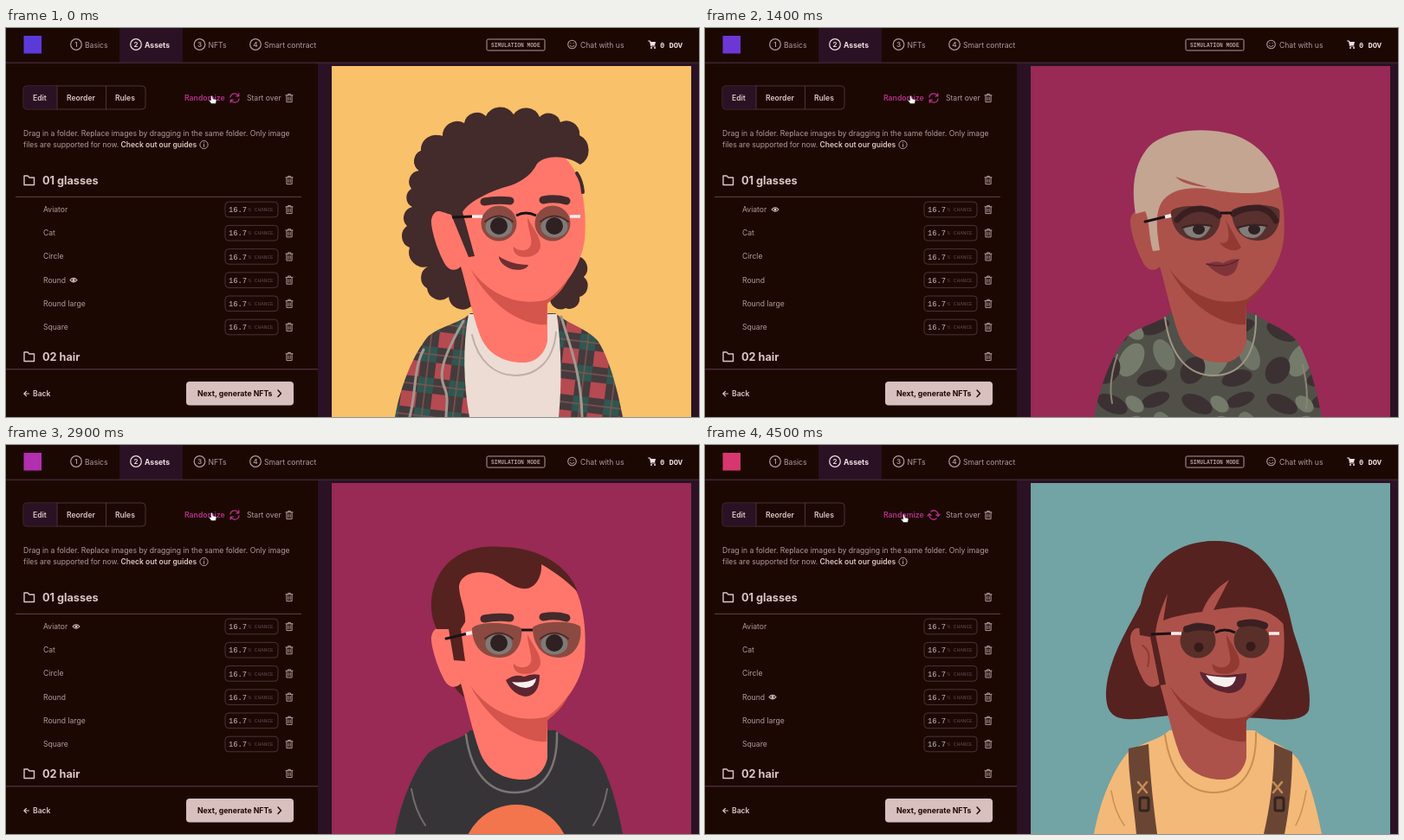
Write an HTML page that moves like this. It is 800 px wide and 450 px high and loops after 4600 ms.

```html
<!DOCTYPE html>
<html lang="en">
<head>
<meta charset="utf-8">
<title>Avatar randomizer</title>
<style>
html, body { margin: 0; width: 100%; height: 100%; overflow: hidden; background: #1c0803; }
svg { display: block; width: 800px; height: 450px; font-family: Inter, Roboto, sans-serif; }
.mono { font-family: "Liberation Mono", "DejaVu Sans Mono", monospace; }
text { white-space: pre; }
</style>
</head>
<body>
<svg id="stage" viewBox="0 0 800 450" xmlns="http://www.w3.org/2000/svg"></svg>
<script>
const fill = (d, c) => `<path d="${d}" fill="${c}"/>`;
const line = (d, c, w = 1, cap = 'round') =>
  `<path d="${d}" fill="none" stroke="${c}" stroke-width="${w}" stroke-linecap="${cap}" stroke-linejoin="round"/>`;
const rect = (x, y, w, h, c, r = 0, extra = '') =>
  `<rect x="${x}" y="${y}" width="${w}" height="${h}" rx="${r}" fill="${c}" ${extra}/>`;
const oval = (x, y, rx, c, ry = rx, extra = '') =>
  `<ellipse cx="${x}" cy="${y}" rx="${rx}" ry="${ry}" fill="${c}" ${extra}/>`;
const text = (x, y, s, c, weight = 400, size = 8.6, cls = '') =>
  `<text x="${x}" y="${y}" fill="${c}" font-weight="${weight}" font-size="${size}" class="${cls}">${s}</text>`;
const group = (s, attrs) => `<g ${attrs}>${s}</g>`;

// ---- interface ----
const PALE = '#dcc6c4', SOFT = '#b29a9b', RULE = '#4b3138', NIGHT = '#2a1224', PINK = '#b5318c';
const ROWS = ['Aviator', 'Cat', 'Circle', 'Round', 'Round large', 'Square'];
const EYE_X = { Aviator: 81, Cat: 65, Round: 78, 'Round large': 101 };
const rowY = i => 210 + i * 27.2;

const trash = (x, y) => group(
  line('M-4,-3.2H4M-1.4,-3.2V-4.6H1.4V-3.2M-3.1,-3.2V4.6H3.1V-3.2M-1.1,-1V2.7M1.1,-1V2.7', SOFT, 1),
  `transform="translate(${x} ${y})"`);
const step = (x, n, label, on) => {
  const c = on ? '#f0e2e4' : SOFT;
  return oval(x, 19, 6.3, 'none', 6.3, `stroke="${c}" stroke-width="1.2"`) +
    `<text x="${x}" y="22" font-size="8" font-weight="600" text-anchor="middle" fill="${c}">${n}</text>` +
    text(x + 10, 22.5, label, c, on ? 700 : 400);
};
const folder = (y, label) =>
  line(`M21,${y - 5}h4l2,2h5.5v8.5h-11.5z`, PALE, 1.4) +
  text(42, y + 4.7, label, PALE, 700, 12.7) + trash(327, y);
const row = (label, i) => {
  const y = rowY(i);
  return text(43, y + 3, label, SOFT) +
    rect(253, y - 8.8, 61, 17.6, 'none', 4, `stroke="${RULE}"`) +
    text(257, y + 3.2, '16.7', '#cbb7b6', 400, 8.8, 'mono') +
    text(279.5, y + 2.2, '% CHANCE', '#634650', 400, 6.1, 'mono') + trash(327, y);
};

const ui =
  rect(0, 0, 800, 40, '#1c0803') + rect(131, 0, 73, 40, NIGHT) +
  rect(0, 40, 360, 410, '#1c0803') + rect(0, 39.5, 800, 1.6, '#3d2430') +
  step(81, 1, 'Basics') + step(150, 2, 'Assets', true) + step(223.5, 3, 'NFTs') + step(288, 4, 'Smart contract') +
  rect(555, 13, 67, 13, 'none', 1.5, `stroke="${SOFT}"`) +
  text(560, 22, 'SIMULATION MODE', SOFT, 700, 6.3, 'mono') +
  oval(653.5, 19, 4.8, 'none', 4.8, `stroke="${SOFT}" stroke-width="1.1"`) +
  line('M651,20.5Q653.5,23 656,20.5M652,17.5v.3M655,17.5v.3', SOFT, 1) +
  text(663, 22.5, 'Chat with us', SOFT) +
  line('M741.5,15h2l1.2,6h4.5', '#f0e2e4', 1.2) + fill('M743.5,16H750L749,20H744.5Z', '#f0e2e4') +
  oval(745, 23, 1, '#f0e2e4') + oval(749, 23, 1, '#f0e2e4') +
  text(755, 22.5, '0 DOV', '#f0e2e4', 700, 8.7, 'mono') +
  rect(20, 67, 141, 27, 'none', 4, `stroke="${RULE}"`) + rect(20.5, 67.5, 38.5, 26, NIGHT, 3) +
  line('M59,67V94M115.5,67V94', RULE) +
  text(31, 83.8, 'Edit', PALE, 600) + text(70, 83.8, 'Reorder', PALE, 600) + text(126, 83.8, 'Rules', PALE, 600) +
  text(278, 83.8, 'Start over', SOFT) + trash(327, 81) +
  text(20, 124.5, 'Drag in a folder. Replace images by dragging in the same folder. Only image', SOFT) +
  text(20, 138, `files are supported for now. <tspan font-weight="600" fill="${PALE}">Check out our guides</tspan>`, SOFT, 400, 8.5) +
  oval(228.5, 135, 4.6, 'none', 4.6, `stroke="${SOFT}"`) + line('M228.5,134.5V137.3M228.5,132.6v.1', SOFT, 1.1) +
  folder(176, '01 glasses') + rect(11, 194.8, 330, 1.2, '#57383d') +
  ROWS.map(row).join('') + folder(380, '02 hair') +
  rect(0, 394, 360, 1.4, '#4a2c36') +
  line('M26.5,423H21M23.5,420.3L20.8,423L23.5,425.7', PALE, 1.2) + text(31, 426, 'Back', PALE, 600) +
  rect(208, 409, 124, 27.5, '#d8c0bf', 4) +
  text(221, 426, 'Next, generate NFTs', '#1c0803', 700, 8.7) +
  line('M314,419L317.5,422.7L314,426.5', '#1c0803', 1.4) +
  rect(20.5, 9, 20.5, 20.5, '#5c3ad9', 0, 'id="logo"') +
  group(text(206, 83.8, 'Randomize', 'currentColor', 600, 8.7) +
    group(line('M-5,-1A5,5 0 0 1 4.3,-2.6M5,1A5,5 0 0 1 -4.3,2.6M4.8,-5.2V-2.2H1.8M-4.8,5.2V2.2H-1.8', 'currentColor', 1.3),
      'id="spin" transform="translate(264 81)"'), 'id="random"') +
  group(line('M-4,0Q0,-4.6 4,0Q0,4.6 -4,0Z', PALE, 1.1) + oval(0, 0, 1.5, PALE), 'id="eye"') +
  group('<path d="M-1.4,-4.5q1-.8 1.8,.4l.6,3 3,.7q1.2,.6 .8,2l-.8,3h-5l-2.6-3.6q.4-1.5 2.2,0z" fill="#fff" stroke="#301a20" stroke-width=".5"/>', 'id="cursor"');

// ---- portraits ----
const CORAL = ['#ff776b', '#d5544b'], BROWN = ['#ad524a', '#923a32'], ROSE = ['#c36f6c', '#a34c46'];
const DARK = '#432a2b', INK = '#191315', MAROON = '#552220', SAND = '#c3a592';

const BODY = 'M449,450C456,412 470,378 487,357C500,345 524,342 536,330H634C650,343 672,348 684,363C699,388 707,424 712,450Z';
const COLLAR = 'M531,335C537,382 560,402 587,402C615,402 637,382 636,333';
const head = ([skin, shade]) =>
  fill('M505,213C503,190 503,165 520,145C535,128 555,123 578,123C610,124 645,140 658,168C668,190 670,220 668,245C664,275 645,300 625,316V362C622,378 610,388 596,387C575,387 555,377 547,355C538,330 532,300 525,276C517,283 510,280 505,270C497,255 490,230 491,222C493,212 499,210 505,213Z', skin) +
  fill('M536,278C555,306 590,324 625,314C635,307 645,297 651,286C643,305 633,311 625,319L624,343C600,345 560,325 536,278Z', shade);
const nose = c => fill('M602,219C608,231 617,242 617,251C617,262 605,267 593,264C588,262 585,258 586,253C592,259 603,259 606,251C608,244 602,232 602,219Z', c);
const brows = (c, y = 201) => line(`M552,${y}Q567,${y - 3} 582,${y - 1}M620,${y - 2}Q634,${y - 5} 647,${y - 1}`, c, 9);

const eyes = {
  wide: [569, 633].map(x => oval(x, 230, 15.5, '#7d7a77', 12.5) + oval(x, 229, 10, '#2f2022') +
    line(`M${x - 16},224q16,-13 32,0`, '#4d2b29', 2)).join(''),
  half: [568, 632].map(x => fill(`M${x - 16},232Q${x},226 ${x + 16},229Q${x + 10},243 ${x},243Q${x - 12},243 ${x - 16},232Z`, '#827d79') +
    oval(x + 2, 233, 7, '#2f2022', 6) + line(`M${x - 17},231q16,-6 34,-2`, '#3a2324', 2)).join(''),
  dot: oval(570, 234, 5.5, '#371a1a') + oval(630, 233, 5.5, '#371a1a')
};

const AVIATOR = 'M538,212C545,203 585,205 595,212C597,230 588,246 570,246C550,246 538,232 538,212ZM608,211C618,203 655,203 663,210C666,230 655,246 638,246C620,246 608,232 608,211Z';
const CAT = 'M533,209L545,206C565,208 590,212 596,218C594,236 580,246 565,245C548,243 538,230 533,209ZM607,218C625,208 645,206 663,205C665,225 652,243 632,244C616,243 608,232 607,218Z';
const glasses = {
  Round: (lens, look) => oval(569, 226, 20.5, lens) + oval(631, 226, 20.5, lens) + look +
    line('M515,219L538,218M589,217Q600,211 612,217', INK, 3, 'butt') +
    line('M538,218H550M651,218H663', '#f4eeee', 3.5, 'butt'),
  Aviator: (lens, look) => fill(AVIATOR, lens) + look +
    line('M508,224L531,218.5', INK, 3) + line('M531,218.5L538,217', '#f4eeee', 4, 'butt') + line('M595,214H608', INK, 3, 'butt'),
  'Round large': (lens, look) => oval(570, 226, 22, lens) + oval(635, 225, 22, lens) + look +
    [570, 635].map(x => oval(x, 226, 22.5, 'none', 22.5, `stroke="${INK}" stroke-width="4"`)).join('') +
    fill('M507,216L538,209L556,206L550,215L538,219L508,223ZM643,206L661,204L661,217L655,218Z', INK) +
    line('M592,219Q602,212 613,219', INK, 5) + oval(545, 213, 2.8, '#eee') + oval(657, 213, 2.8, '#eee'),
  Cat: (lens, look) => fill(CAT, lens) + look +
    line('M514,222L536,217M595,219Q601,216 607,219', INK, 4) +
    line('M536,209C560,208 585,212 595,218M607,218C620,210 645,206 662,206', '#2c1718', 3) +
    oval(541, 213, 3.4, '#f4eeee') + oval(661, 211, 3.4, '#f4eeee')
};

// Outline of curls: one outward arc between each pair of points.
const curls = pts => 'M' + pts.map(([x, y], i) => {
  if (!i) return `${x},${y}`;
  const r = 0.57 * Math.hypot(x - pts[i - 1][0], y - pts[i - 1][1]);
  return `A${r},${r} 0 0 0 ${x},${y}`;
}).join('');
const buzz = c =>
  fill('M497,213C486,190 490,160 507,140C525,120 550,116 572,118C615,118 650,140 660,170C646,156 632,146 618,138C619,150 613,164 602,166C584,168 574,151 556,148C536,145 523,153 523,165C524,180 531,190 530,205L525,213L530,250L517,249L511,213Z', c);

const shirt = fill(BODY, '#363437') + line(COLLAR, '#7b7574', 2.5) +
  line('M468,398Q472,422 484,440M694,398Q690,422 678,440', '#716b6a', 2) +
  oval(589, 478, 62, '#f2754d');

const plaid =
  fill(BODY, 'url(#plaid)') +
  fill('M534,331C527,368 528,412 535,450H638C642,410 641,370 636,331Z', '#ecdcd4') +
  line('M528,339C512,368 498,394 505,413C512,428 508,438 508,450M641,334C650,365 664,398 665,450M482,372C470,395 474,420 466,450', '#a3978e', 3) +
  line('M538,355C545,386 565,402 588,402C612,402 632,386 635,352', '#c0afa8', 2);

const camo = fill(BODY, 'url(#camo)') + line(COLLAR, '#a09484', 2) +
  line('M476,378Q465,410 470,434M690,390Q697,420 694,440', '#8b8374', 2);

let flecks = '';
for (let i = 0; i < 6; i++) for (let j = 0; j < 20; j++) {
  const x = 450 + j * 14 + i % 2 * 7, y = 352 + i * 19 + j * 7 % 11;
  flecks += line(`M${x},${y}l${(582 - x) / 30},11`, (i + j) % 3 ? '#e5d6ca' : '#a39e99', 4.5);
}
const sweater = fill(BODY, '#c5bfba') + group(flecks, 'clip-path="url(#body)"') +
  fill('M525,340L487,357C478,368 473,380 470,393L484,407L529,364ZM646,340L684,362C690,374 693,390 691,405L680,408L639,364Z', '#a05c35') +
  line('M533,335C540,377 561,395 587,395C614,395 631,377 634,333', '#eadad0', 15, 'butt') +
  `<path d="M533,335C540,377 561,395 587,395C614,395 631,377 634,333" fill="none" stroke="#b2a298" stroke-width="14" stroke-dasharray="2 8"/>` +
  line('M525,338C532,386 557,404 587,404C618,404 640,384 643,337', '#a79b93', 2);

const strap = d => fill(d, '#6b4533');
const overalls = fill(BODY, '#f3b978') + line(COLLAR, '#c98e52', 2) +
  strap('M489,351L512,346C514,385 518,420 522,450H498C495,415 488,380 489,351Z') +
  strap('M657,346L678,355C678,390 674,425 669,450H645C652,420 657,385 657,346Z') +
  [505, 661].map(x => line(`M${x - 5},390l10,12m0,-12l-10,12`, '#c58c55', 2.5) +
    rect(x - 3, 408, 10, 15, 'none', 2, 'stroke="#33231f" stroke-width="3"')).join('') +
  line('M469,400Q473,425 484,440M694,400Q690,425 682,440', '#c98e52', 1.5);

// Each look starts bare for a moment, then all layers appear.
const looks = [
  { start: 0, skin: CORAL, pair: 'Round', bg: '#f9c16a',
    back: fill(curls([[510, 128], [479, 142], [477, 165], [468, 186], [469, 207], [463, 229], [466, 254], [487, 276], [486, 301], [511, 311], [537, 322]]) + 'Z', DARK) +
      fill(curls([[628, 312], [646, 324], [662, 311], [667, 288], [660, 264]]) + 'Z', DARK),
    top: plaid,
    face: nose(CORAL[1]) + fill('M569,264C577,270 590,274 603,274C602,279 592,281 584,279C575,276 569,270 569,264Z', '#6d2f31'),
    hair: fill(curls([[663, 158], [662, 124], [640, 109], [616, 103], [586, 100], [554, 102], [529, 110], [504, 126], [479, 142], [477, 165], [485, 200]]) +
        'L498,211L514,216L534,265L541,264L527,213C535,200 560,188 583,182C597,177 608,168 613,157C622,147 645,146 663,158Z', DARK) +
      line('M659,168Q665,177 666,190', DARK, 4) + brows(DARK),
    lens: '#8b4a41', look: eyes.wide },
  { start: 600, skin: BROWN, pair: 'Aviator', bg: '#982a55', top: camo,
    face: fill('M601,222L619,254C610,262 598,254 594,248C606,252 607,240 601,222Z', BROWN[1]) +
      fill('M579,273Q590,268 598,272Q608,266 616,268Q614,287 600,287Q589,284 579,273Z', '#80343a') + line('M579,273Q600,279 616,268', '#542428', 1.5),
    hair: fill('M497,215C491,180 497,150 517,133C540,117 575,116 600,121C637,128 660,157 663,184C640,195 605,191 580,186C555,183 538,188 529,199C518,213 522,237 525,257L517,258C512,240 513,220 508,212Z', SAND) +
      fill('M543,172Q560,178 580,184Q552,182 543,172Z', BROWN[0]),
    lens: '#58302e', look: eyes.half + line('M545,222Q556,209 572,209Q586,210 593,217M610,215Q622,207 640,208Q654,211 659,223', '#3a1f21', 7) },
  { start: 1600, skin: ROSE, pair: 'Round large', bg: '#d8dadb', top: shirt,
    back: fill('M514,274L526,276L531,293Q521,287 514,274Z', SAND),
    face: fill('M602,225L613,252C608,262 598,262 592,256C602,256 604,244 602,225Z', '#9d3330') +
      fill('M571,262C585,266 602,266 617,262C619,276 609,284 596,282C583,280 574,273 571,262Z', '#6a2729') +
      fill('M578,265Q596,268 611,265Q612,277 599,277Q584,276 578,265Z', '#f7f1ee'),
    hair: buzz(SAND), lens: '#70433f', look: eyes.half },
  { start: 2500, skin: CORAL, pair: 'Aviator', bg: '#982a55', top: shirt,
    back: fill('M514,274L526,276L531,293Q521,287 514,274Z', MAROON),
    face: nose(CORAL[1]) + fill('M577,272Q588,264 598,268Q607,264 616,266Q616,290 599,291Q584,288 577,272Z', '#5d2530') +
      fill('M584,274Q600,276 612,270Q611,280 600,281Q589,280 584,274Z', '#f7f1ee'),
    hair: buzz(MAROON) + brows(DARK), lens: '#8b4a41', look: eyes.wide },
  { start: 3500, skin: BROWN, pair: 'Cat', bg: '#f9c16a', top: sweater,
    back: fill('M585,108C545,108 514,130 507,170C503,200 500,225 487,255C475,285 482,305 493,318C500,334 486,341 474,337C477,348 486,350 493,349C488,356 485,359 482,361C504,362 523,350 533,333L634,331C647,350 668,362 686,369C680,360 678,356 679,351C688,351 693,345 694,337C678,341 672,325 678,303C687,280 683,255 673,228C667,205 668,180 655,150C643,120 615,107 585,108Z', DARK),
    face: nose(BROWN[1]) + fill('M579,274Q590,268 599,271Q610,266 616,269Q617,291 601,291Q588,289 579,274Z', '#652529') +
      fill('M587,276Q602,277 612,272Q609,281 600,282Q592,281 587,276Z', '#f7f1ee'),
    hair: fill('M601,125C601,155 595,162 577,175C553,190 543,207 537,233C535,255 542,275 537,294L525,310L488,290L495,220L504,160L545,113L600,108Z', DARK) +
      fill('M601,125C603,150 610,162 630,173C650,181 659,190 666,218L673,200L655,150L620,112L590,108Z', DARK),
    lens: '#602c2b', look: eyes.dot + line('M555,213Q570,209 586,213M618,208Q632,204 647,209', '#341d20', 8) },
  { start: 4300, skin: BROWN, pair: 'Round', bg: '#72a3a5', top: overalls,
    back: fill('M588,111C550,112 525,138 510,170C493,205 465,245 463,285C462,315 476,318 500,317L545,312L640,316C665,318 690,321 697,307C702,280 687,240 679,215C672,180 662,151 645,134C630,116 610,111 588,111Z', MAROON),
    face: line('M505,232Q516,239 511,256', BROWN[1], 2) + nose(BROWN[1]) +
      fill('M571,262C588,269 606,266 625,264C626,281 613,290 599,286C584,283 574,275 571,262Z', '#5a2432') +
      fill('M578,266Q599,270 613,268Q611,280 600,280Q585,278 578,266Z', '#f7f1ee'),
    hair: fill('M502,220C496,165 522,112 588,111C640,112 666,160 671,211C652,186 622,184 587,191L605,156C589,166 579,179 574,193C557,195 542,198 529,203L534,172C526,190 521,205 520,219L532,277L525,278L514,222Z', MAROON),
    lens: '#592f2a', look: eyes.dot + line('M556,213Q570,208 585,212M618,207Q633,203 646,209', '#3a2022', 8) }
];

const portrait = (p, i) => {
  const layer = s => group(s, 'class="full"');
  return group(
    layer(rect(376, 44, 415, 406, p.bg) + (p.back || '') + p.top) + head(p.skin) +
    layer(p.face + p.hair + glasses[p.pair](p.lens, p.look)),
    `id="look${i}"`);
};

const defs = `<defs>
<clipPath id="body"><path d="${BODY}"/></clipPath>
<pattern id="plaid" width="36" height="36" patternUnits="userSpaceOnUse" patternTransform="rotate(7)">
${rect(0, 0, 36, 36, '#453a3c')}${rect(0, 0, 18, 18, '#b54a51')}${rect(18, 18, 18, 18, '#2f5750')}
${rect(26, 0, 1.5, 36, '#7d5553')}${rect(0, 26, 36, 1.5, '#7d5553')}
</pattern>
<pattern id="camo" width="98" height="84" patternUnits="userSpaceOnUse" x="450" y="334">
${rect(0, 0, 98, 84, '#505049')}${[[20, 17, 19, 10, '#3b3133', 25], [70, 12, 17, 8, '#3b3133', -20], [42, 50, 13, 21, '#757b6b', 30], [80, 44, 11, 19, '#6f7566', -25],
    [15, 62, 13, 17, '#3b3133', 35], [66, 71, 18, 9, '#3b3133', -15], [46, 17, 12, 8, '#757b6b', 40]]
    .map(([x, y, rx, ry, c, a]) => oval(x, y, rx, c, ry, `transform="rotate(${a} ${x} ${y})"`)).join('')}
</pattern></defs>`;

const stage = document.getElementById('stage');
stage.innerHTML = defs + rect(360, 40, 440, 410, NIGHT) + looks.map(portrait).join('') + ui;
const el = id => document.getElementById(id);
const views = looks.map((_, i) => el('look' + i));

// ---- playback ----
const LOOP = 4600, STEP = 100;
const LOGO = [[0, 92, 58, 217], [900, 96, 57, 218], [1900, 122, 53, 207], [2500, 150, 48, 194], [2900, 178, 47, 176], [3900, 202, 48, 158], [4500, 214, 55, 110]];
const logoColor = t => {
  const k = Math.max(1, LOGO.findIndex(s => s[0] >= t)), a = LOGO[k - 1], b = LOGO[k];
  const f = (t - a[0]) / (b[0] - a[0]);
  return `rgb(${[1, 2, 3].map(i => Math.round(a[i] + (b[i] - a[i]) * f))})`;
};
const place = (id, x, y, turn = 0) => el(id).setAttribute('transform', `translate(${x} ${y}) rotate(${turn})`);

let last = -1;
function draw(now) {
  const t = Math.floor(now % LOOP / STEP) * STEP;
  if (t !== last) {
    last = t;
    const active = looks.filter(p => p.start <= t).length - 1, look = looks[active];
    const bare = active > 0 && t < look.start + STEP;
    views.forEach((v, i) => { v.style.display = i === active ? '' : 'none'; });
    views[active].querySelectorAll('.full').forEach(g => { g.style.display = bare ? 'none' : ''; });
    place('eye', EYE_X[look.pair], rowY(ROWS.indexOf(look.pair)));
    const idle = t >= 1800 && t < 2600 || t >= 3700 && t < 4300;
    el('random').style.color = idle ? '#aa91a1' : PINK;
    el('logo').setAttribute('fill', logoColor(t));
    const moved = t >= 4400;
    place('cursor', moved ? 230 : 238, moved ? 85 : 83);
    place('spin', 264, 81, moved ? 40 : 0);
  }
  requestAnimationFrame(draw);
}
requestAnimationFrame(draw);
</script>
</body>
</html>
```
